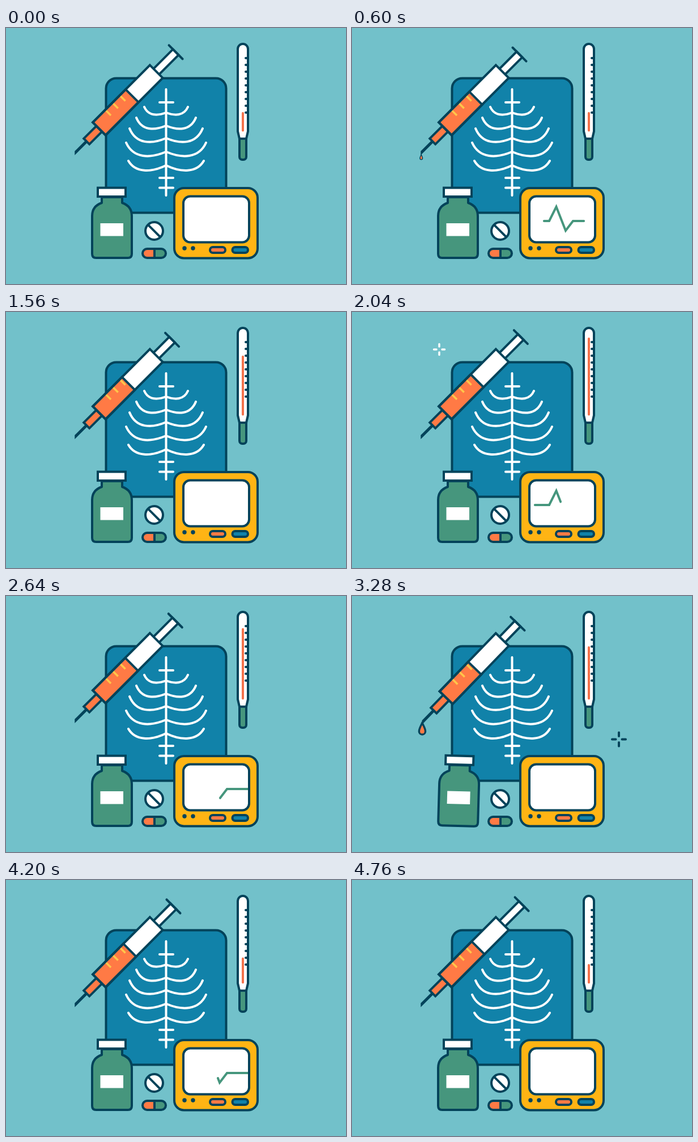
Recreate the animation shown at these times as an HTML page. Size 600x451 px, loop 4.8 s.

```html
<!DOCTYPE html>
<html lang="en">
<head>
<meta charset="utf-8">
<title>Medical kit</title>
<style>
  html, body { margin: 0; width: 100%; height: 100%; overflow: hidden; background: #72c1ca; }
  svg { display: block; width: 100%; height: 100%; }
  .ink { stroke: #03435a; stroke-width: 4; }
  .line { fill: none; stroke-linecap: round; }
  .white { fill: #fff; }
  .orange { fill: #ff7a45; }
  .green { fill: #46967d; }
  .blue { fill: #1182a9; }
  .yellow { fill: #ffb414; }
  .dark { fill: #03435a; }
</style>
</head>
<body>
<svg viewBox="0 0 600 451" stroke-linejoin="round">
  <!-- x-ray -->
  <rect class="ink blue" x="176.5" y="88.5" width="212" height="237" rx="18"/>
  <path id="ribs" class="line" stroke="#fff" stroke-width="4"/>

  <!-- syringe, drawn along its axis with the needle tip at 0,0 -->
  <g id="syringe">
    <g transform="translate(121 221) rotate(-45)" stroke-linejoin="miter">
      <path class="dark" d="M-2 2.4L3-2.7H30V2.4Z"/>
      <g id="rod">
        <rect class="ink white" x="190" y="-7" width="62.5" height="14"/>
        <path class="ink line" d="M252.5-17V17"/>
      </g>
      <rect class="ink orange" x="30" y="-7" width="31.5" height="14"/>
      <rect class="white" x="61.5" y="-16" width="142.5" height="32"/>
      <rect id="liquid" class="ink orange" x="61.5" y="-16" height="32"/>
      <path d="M92.6-14V-2M110.5-14V-2M128.7-14V-2" stroke="#ffc64a" stroke-width="3.5"/>
      <rect class="ink" fill="none" x="61.5" y="-16" width="142.5" height="32"/>
    </g>
  </g>
  <path id="drop" class="ink orange" d="M0 0C2 6 6.5 12 6.5 18A6.5 6.5 0 0 1-6.5 18C-6.5 12-2 6 0 0Z"/>

  <!-- thermometer -->
  <path class="ink green" d="M412 195H424V227a5 5 0 0 1-5 5h-2a5 5 0 0 1-5-5Z"/>
  <path class="ink white" d="M409 37a9 9 0 0 1 18 0V182L424 195H412L409 182Z"/>
  <path id="ticks" class="ink line" stroke-width="3.5"/>
  <path id="mercury" class="line" stroke="#f4714a" stroke-width="4"/>

  <!-- bottle -->
  <g id="bottle">
    <path class="ink green" d="M169 298V308Q152 314 152 331V398Q152 405 159 405H215Q222 405 222 398V331Q222 314 205 308V298Z"/>
    <rect class="ink white" x="162" y="281.5" width="49" height="15.5" stroke-linejoin="miter"/>
    <rect class="white" x="166.5" y="344" width="40.5" height="22.5"/>
  </g>

  <!-- pills -->
  <circle class="ink white" cx="261.5" cy="357.5" r="15.5"/>
  <path class="ink" d="M250.5 346.5L272.5 368.5"/>
  <path class="orange" d="M262 389H249a8 8 0 0 0 0 16H262Z"/>
  <path class="green" d="M262 389H274a8 8 0 0 1 0 16H262Z"/>
  <rect class="ink" fill="none" x="241" y="389" width="41" height="16" rx="8"/>
  <path class="ink" d="M262 389V405"/>

  <!-- monitor -->
  <rect class="ink yellow" x="297" y="282" width="147" height="123.5" rx="17"/>
  <rect class="white" x="313" y="296.5" width="116" height="81" rx="12"/>
  <path id="pulse" class="line" stroke="#46967d" stroke-width="4" stroke-linejoin="miter" d="M313 340H348L360.5 315L377 357L390 340H427"/>
  <rect class="ink" fill="none" x="313" y="296.5" width="116" height="81" rx="12"/>
  <circle class="dark" cx="315" cy="388" r="3.7"/>
  <circle class="dark" cx="330" cy="388" r="3.7"/>
  <rect class="ink orange" x="360" y="386" width="27" height="10" rx="5"/>
  <rect class="ink blue" x="399.5" y="386" width="27.5" height="10" rx="5"/>

  <path id="darkSpark" class="ink line"/>
  <path id="whiteSpark" class="line" stroke="#fff" stroke-width="3.5"/>
</svg>
<script>
const LOOP = 4800;
const $ = id => document.getElementById(id);
const set = (id, name, value) => $(id).setAttribute(name, value);
const show = (id, on) => set(id, 'visibility', on ? 'visible' : 'hidden');
const progress = (t, from, to) => Math.min(1, Math.max(0, (t - from) / (to - from)));
const ease = u => (1 - Math.cos(Math.PI * u)) / 2;

// Each rib: outer x, outer y, drop to the spine, control depth
const ribs = [[244, 139, 10, 16], [230, 158, 14, 23], [218, 177, 17, 28], [212, 202, 16, 28], [216, 234, 8, 21]];
const ribPath = (x, y, join, depth) => [1, -1].map(side => {
  const w = 282.5 - x, at = k => 282.5 - side * w * (1 - k);
  return `M${at(0)} ${y}C${at(.18)} ${y + depth} ${at(.6)} ${y + depth} 282.5 ${y + join}`;
}).join('');
set('ribs', 'd', 'M282.5 108V295M271 131H295M271 264H295M271 281.5H295' + ribs.map(r => ribPath(...r)).join(''));
set('ticks', 'd', Array.from({ length: 9 }, (_, i) => `M423 ${53 + 12 * i}h2`).join(''));

const pulseLength = $('pulse').getTotalLength();

function drawSpark(id, x, y, inner, outer, t, from, to) {
  const grow = progress(t, from, from + 80), fade = progress(t, to - 80, to);
  const a = inner + (outer - inner) * fade, b = inner + (outer - inner) * grow;
  show(id, grow > 0 && fade < 1);
  set(id, 'd', [[1, 0], [-1, 0], [0, 1], [0, -1]].map(([dx, dy]) =>
    `M${x + dx * a} ${y + dy * a}L${x + dx * b} ${y + dy * b}`).join(''));
}

function drawDrop(t, sway) {
  const fall = Math.min(156, .0028 * Math.max(0, t - 1095) ** 2);
  const size = progress(t, 400, 960), shrink = 1 - progress(t, 1360, 1560);
  const x = 122.2 - 1.7 * fall / 143 + 3 * sway;
  show('drop', size * shrink > 0);
  set('drop', 'transform', `translate(${x} ${223 + fall + 13 * (1 - shrink)}) scale(${size * shrink})`);
}

function drawPulse(t) {
  const head = pulseLength * ease(progress(t, 160, 720));
  const tail = pulseLength * progress(t, 185, 1240) ** 2;
  show('pulse', head - tail > .5);
  set('pulse', 'stroke-dasharray', `0 ${tail} ${Math.max(0, head - tail)} 999`);
}

function draw(t) {
  const half = t % 2400;
  const push = 11.5 * ease(half / 1200);
  const u = progress(t, 3180, 3720), sway = Math.sin(u * 4 * Math.PI) * (1 - u);

  set('rod', 'transform', `translate(${-push})`);
  set('liquid', 'width', 82 - push);
  set('syringe', 'transform', `rotate(${-1.6 * sway} 265 77)`);
  set('bottle', 'transform', `rotate(${2.8 * sway} 187 405)`);
  drawDrop(half, sway);

  const heat = ease(progress(t, 760, 2040)) - ease(progress(t, 2040, LOOP));
  set('mercury', 'd', `M418 180.5V${150 - 103 * heat}`);

  drawPulse(t % 1600);
  drawSpark('darkSpark', 471, 252.5, 5.5, 12, half, 760, 1280);
  drawSpark('whiteSpark', 154, 66, 5, 9.5, t, 1840, 2200);
}

function frame() {
  draw(performance.now() % LOOP);
  requestAnimationFrame(frame);
}
frame();
</script>
</body>
</html>
```
